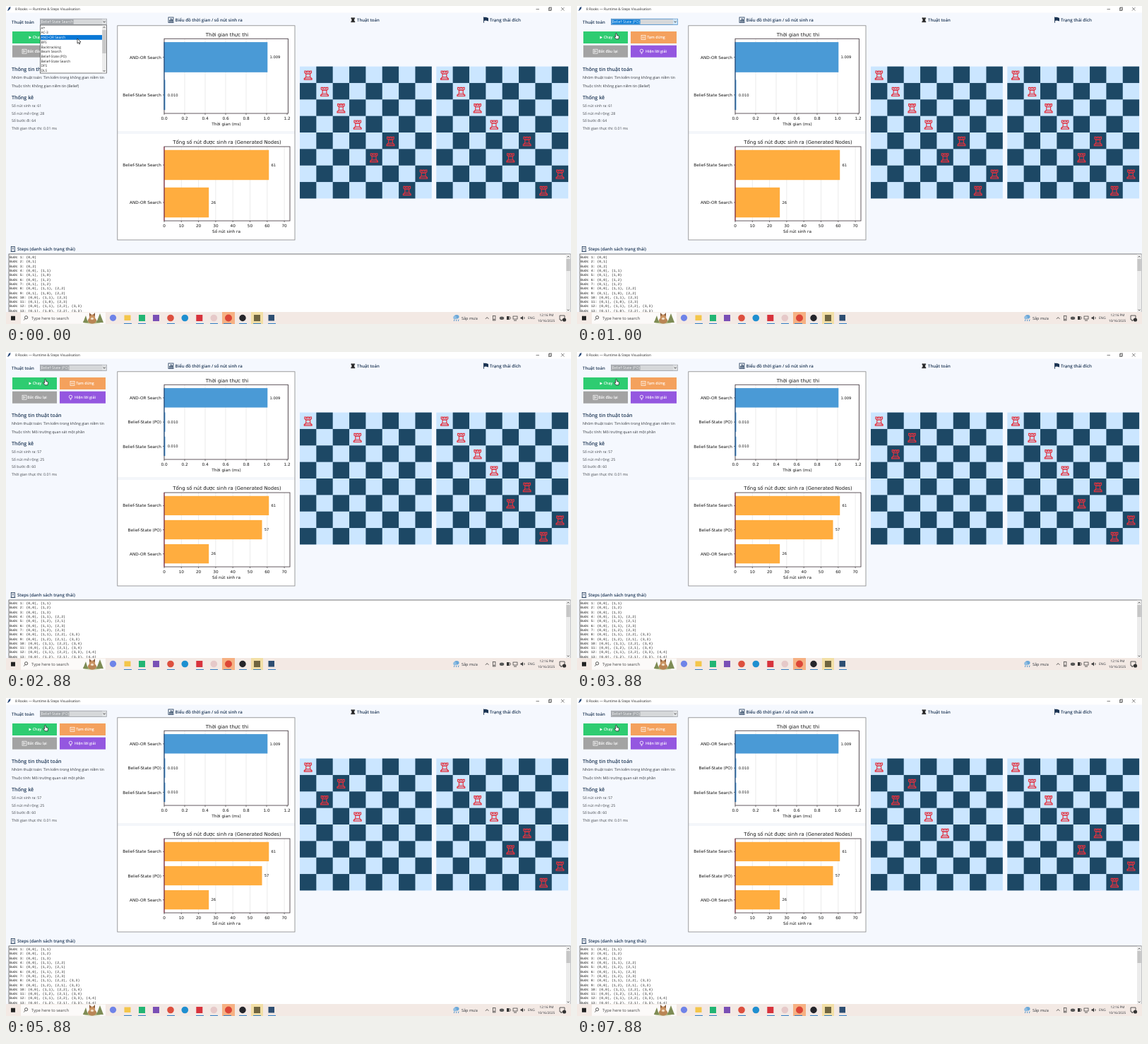
Recreate the animation shown at these times as an HTML page with a canvas. Size 800 by 450 pixels, loop 8000 ms.

```html
<!DOCTYPE html>
<html lang="vi">
<head>
<meta charset="utf-8">
<style>
  html, body { margin: 0; width: 100%; height: 100%; overflow: hidden; background: #f5f8fe; }
  canvas { display: block; width: 800px; height: 450px; }
</style>
</head>
<body>
<canvas id="stage" width="800" height="450"></canvas>
<script>
const ctx = document.getElementById('stage').getContext('2d');
ctx.textRendering = 'geometricPrecision';

const LOOP = 8000, PICK = 600, RUN = 1500, STEP = 500;
const UI = '"Open Sans", "Noto Sans", sans-serif';
const PLOT = '"DejaVu Sans", sans-serif';
const MONO = '"Liberation Mono", monospace';
const NAVY = '#1c3553', INK = '#30343a';

const GOAL = '00 11 22 33 45 54 67 76';
const OLD_STEPS = ['00', '01', '02', '00 11', '01 10', '00 12', '01 12', '00 11 22', '01 10 22',
  '00 11 23', '01 10 23', '00 11 22 33', '01 10 22 33'];
const NEW_STEPS = ['00 11', '00 12', '00 13', '00 11 22', '00 12 21', '00 11 23', '00 12 23', '00 11 22 33',
  '00 12 21 33', '00 11 22 34', '00 12 21 34', '00 11 22 33 44', '00 12 21 33 44'];
const MENU = ['A*', 'AC-3', 'AND-OR Search', 'BFS', 'Backtracking', 'Beam Search',
  'Belief-State (PO)', 'Belief-State Search', 'DFS', 'DLS'];

function rect(x, y, w, h, fill, stroke, width = 0.7) {
  if (fill) { ctx.fillStyle = fill; ctx.fillRect(x, y, w, h); }
  if (stroke) { ctx.strokeStyle = stroke; ctx.lineWidth = width; ctx.strokeRect(x, y, w, h); }
}

function disc(x, y, r, fill, ry = r) {
  ctx.fillStyle = fill;
  ctx.beginPath();
  ctx.ellipse(x, y, r, ry, 0, 0, 7);
  ctx.fill();
}

// points: "x,y x,y ..." ; several strokes are separated by "|"
function path(points, { fill, stroke, width = 0.8, close = false }) {
  ctx.beginPath();
  for (const part of points.split('|')) {
    part.trim().split(' ').forEach((p, i) => {
      const [x, y] = p.split(',').map(Number);
      i ? ctx.lineTo(x, y) : ctx.moveTo(x, y);
    });
    if (close) ctx.closePath();
  }
  if (fill) { ctx.fillStyle = fill; ctx.fill(); }
  if (stroke) { ctx.strokeStyle = stroke; ctx.lineWidth = width; ctx.stroke(); }
}

function at(x, y, draw, scale = 1) {
  ctx.save();
  ctx.translate(x, y);
  ctx.scale(scale, scale);
  draw();
  ctx.restore();
}

// y is the middle of the capital letters
function text(str, x, y, size, { color = INK, weight = 400, font = UI, align = 'left' } = {}) {
  ctx.font = `${weight} ${size}px ${font}`;
  ctx.fillStyle = color;
  ctx.textAlign = align;
  ctx.fillText(str, x, y + size * 0.36);
}

const heading = (str, x, y, size = 6.1) => text(str, x, y, size, { color: NAVY, weight: 600 });

function titleBar() {
  rect(0, 0, 800, 9.5, '#fff');
  path('2,7 4,2 6.5,1 6,4 4,6', { fill: '#2a4a78', close: true });
  text('8 Rooks — Runtime & Steps Visualisation', 13, 4.7, 4.83, { color: '#222' });
  path('750.5,4.5 755,4.5|786,2 790.5,6.5|790.5,2 786,6.5', { stroke: '#333', width: 0.6 });
  rect(768.5, 2.8, 3.4, 3.6, null, '#333', 0.6);
  rect(769.6, 1.9, 3.2, 3.4, null, '#333', 0.4);
}

function button(label, x, y, w, color, icon) {
  rect(x, y, w, 17, color);
  text(label, x + w / 2 + 3.5, y + 8.2, 5.35, { color: '#fff', weight: 600, align: 'center' });
  at(x + w / 2, y + 8.5, icon);
}

function sidebar(ran, t) {
  heading('Thuật toán', 8, 22.5, 6);
  const picked = t >= PICK;
  const focused = picked && !ran;
  const choice = picked ? MENU[6] : MENU[7];
  rect(48.5, 18.2, 94, 8.3, '#d6d8da', focused ? '#2d7cc4' : '#8d9299');
  rect(136, 18.6, 6.2, 7.5, focused ? '#cfe6f8' : '#dfe1e3');
  ctx.font = `5.25px ${UI}`;
  rect(49.3, 19.2, ctx.measureText(choice).width + 0.6, 6.4, focused ? '#0078d7' : '#9da1a5');
  text(choice, 49.5, 22.4, 5.25, { color: '#fff' });
  path('137.7,21.5 139.2,23.2 140.7,21.5', { stroke: '#333' });

  const white = { stroke: '#fff', width: 0.7 };
  button('Chạy', 9, 36, 63, '#2ecc71', () => path('-8,-2 -4.5,0 -8,2', { fill: '#fff', close: true }));
  button('Tạm dừng', 76, 36, 65, '#f4a15d', () => {
    rect(-17.5, -3, 6, 6, null, '#fff');
    path('-15.5,-1.5 -15.5,1.5|-13.5,-1.5 -13.5,1.5', white);
  });
  button('Bắt đầu lại', 9, 55.7, 63, '#a3a3a3', () => {
    rect(-17.5, -3, 6, 6, null, '#fff');
    path('-15.8,1.5 -15.8,-1.5 -13.2,0 -15.8,1.5', white);
  });
  button('Hiện lời giải', 76, 55.7, 65, '#9457e0', () => {
    ctx.beginPath();
    ctx.arc(-17, -0.8, 2.2, 0, 7);
    ctx.strokeStyle = '#fff';
    ctx.stroke();
    path('-18,2.2 -16,2.2|-17.7,3.4 -16.3,3.4', white);
  });

  heading('Thông tin thuật toán', 8, 89.7, 7.1);
  text('Nhóm thuật toán: Tìm kiếm trong không gian niềm tin', 8, 101.5, 5.22);
  text('Thuộc tính: ' + (ran ? 'Môi trường quan sát một phần' : 'Không gian niềm tin (Belief)'), 8, 112.7, 5.22);
  heading('Thống kê', 8, 129, 7.1);
  const [made, expanded, moves] = ran ? [57, 25, 60] : [61, 28, 64];
  [`Số nút sinh ra: ${made}`, `Số nút mở rộng: ${expanded}`, `Số bước đi: ${moves}`, 'Thời gian thực thi: 0.01 ms']
    .forEach((line, i) => text(line, 8, 141.5 + i * 10.4, 5.22, { color: '#44484e' }));
}

function dropdown(cursorY) {
  const pitch = 6.7, top = 27.7;
  const hovered = Math.floor((cursorY - top) / pitch);
  rect(48.5, 27, 94, 68, '#fff', '#444');
  MENU.forEach((item, i) => {
    const y = top + i * pitch;
    if (i === hovered) rect(49, y, 87, pitch, '#0a78d6');
    text(item, 49.5, y + 3.3, 4.8, { color: i === hovered ? '#fff' : '#222' });
  });
  rect(136, 27.5, 6, 67, '#ececec');
  rect(136.3, 34, 5.4, 33, '#c8c8c8');
  path('137.6,31 139,29.4 140.4,31|137.6,91 139,92.6 140.4,91', { stroke: '#444' });
}

function barChart({ top, bottom, right, unit, ticks, title, axis, color, bars }) {
  const left = 224, height = bottom - top;
  const label = { font: PLOT, color: '#161616' };
  const center = { ...label, align: 'center' };
  text(title, 313, top - 6.2, 6.9, center);
  ticks.forEach(v => {
    const x = left + v * unit;
    path(`${x},${top} ${x},${bottom}`, { stroke: '#dedede', width: 0.6 });
    path(`${x},${bottom} ${x},${bottom + 2}`, { stroke: '#222', width: 0.6 });
    text(unit > 100 ? v.toFixed(1) : v, x, bottom + 6.9, 5.75, center);
  });
  // 5% padding around bars that are 0.8 of a slot
  const slot = height / 1.1 / (bars.length - 0.2);
  bars.forEach(([name, value], i) => {
    const y = top + height / 22 + slot * (i + 0.4);
    rect(left, y - slot * 0.4, value * unit, slot * 0.8, color);
    path(`${left - 2},${y} ${left},${y}`, { stroke: '#222', width: 0.6 });
    text(name, left - 4, y, 5.75, { ...label, align: 'right' });
    text(unit > 100 ? value.toFixed(3) : value, left + value * unit + 3.2, y, 5.2, label);
  });
  rect(left, top, right - left, height, null, '#3c3038', 0.8);
  text(axis, 312, bottom + 15.2, 5.75, center);
}

function charts(ran) {
  rect(158, 28, 251, 303, '#f4f6fa');
  rect(158, 28, 251, 149, '#fff');
  rect(158, 181, 251, 150, '#fff');
  rect(157.8, 27.8, 251.2, 303.2, null, '#858585', 0.8);
  const po = ran ? [['Belief-State (PO)', 0.01]] : [];
  barChart({
    top: 46.3, bottom: 152, right: 399.5, unit: 145, ticks: [0, 0.2, 0.4, 0.6, 0.8, 1, 1.2],
    title: 'Thời gian thực thi', axis: 'Thời gian (ms)', color: '#4a9ad6',
    bars: [['AND-OR Search', 1.009], ...po, ['Belief-State Search', 0.01]],
  });
  path('224,51 224,147', { stroke: '#1f5c9c', width: 1 });
  barChart({
    top: 199, bottom: 304, right: 402, unit: 2.43, ticks: [0, 10, 20, 30, 40, 50, 60, 70],
    title: 'Tổng số nút được sinh ra (Generated Nodes)', axis: 'Số nút sinh ra', color: '#ffad3f',
    bars: [['Belief-State Search', 61], ...po.map(([name]) => [name, 57]), ['AND-OR Search', 26]],
  });
  path('224,199 224,304', { stroke: '#a03048', width: 0.9 });
}

function rook(color, filled) {
  const outline = '-4.8,-6 -2.6,-6 -2.6,-4.6 -1.1,-4.6 -1.1,-6 1.1,-6 1.1,-4.6 2.6,-4.6 2.6,-6 4.8,-6 ' +
    '4.8,-3.4 2.9,-2 2.9,2.4 4.4,3.6 4.4,4.6 5.4,4.6 5.4,6.2 -5.4,6.2 -5.4,4.6 -4.4,4.6 -4.4,3.6 -2.9,2.4 -2.9,-2 -4.8,-3.4';
  path(outline, { fill: filled && color, stroke: color, width: 1.15, close: true });
  if (!filled) path('-4,-2.8 4,-2.8|-3,-1.6 3,-1.6|-3,2.4 3,2.4|-4.4,4.2 4.4,4.2', { stroke: color, width: 0.9 });
}

function board(left, rooks) {
  const top = 85.6, cell = 23.35;
  rect(left, top, cell * 8, cell * 8, '#cbe6ff');
  for (let i = 0; i < 64; i++) {
    const row = i >> 3, col = i & 7;
    if ((row + col) % 2) rect(left + col * cell, top + row * cell, cell, cell, '#1d4865');
  }
  for (const [row, col] of rooks.split(' '))
    at(left + (+col + 0.5) * cell, top + (+row + 0.53) * cell, () => rook('#e2323f'));
}

function headers() {
  rect(230, 16, 7, 7.5, null, NAVY, 0.8);
  [[231.2, 3], [233, 5.2], [234.8, 4]].forEach(([x, h]) => rect(x, 22.6 - h, 1.2, h, NAVY));
  heading('Biểu đồ thời gian / số nút sinh ra', 239.5, 19.5);
  at(491.3, 19.7, () => rook('#222', true), 0.5);
  heading('Thuật toán', 497, 19.5, 6);
  path('676.5,15.5 676.5,23.8', { stroke: NAVY, width: 0.9 });
  path('676.5,16 679.5,15.7 683,17 683,21.5 679.5,20.5 676.5,21', { fill: NAVY, close: true });
  heading('Trạng thái đích', 685, 19.5, 6.15);
}

function stepList(steps) {
  rect(7.3, 340.5, 5, 6.8, null, NAVY, 0.8);
  path('8.7,342.5 11,342.5|8.7,344 11,344|6.5,347.3 13.5,347.3', { stroke: NAVY, width: 0.6 });
  heading('Steps (danh sách trạng thái)', 16, 344.2);
  rect(4, 351, 795, 84, '#fff', '#555', 0.8);
  steps.forEach((rooks, i) => {
    const places = rooks.split(' ').map(([r, c]) => `(${r},${c})`).join(', ');
    text(`Bước ${i + 1}: ${places}`, 5, 355.2 + i * 6.32, 4.88, { font: MONO, color: '#1c1c1c' });
  });
  rect(793, 351.5, 6.3, 82, '#ececec');
  rect(793.4, 358, 5.4, 17, '#c6c6c6');
  path('794.7,355.5 796.1,354 797.5,355.5|794.7,429.5 796.1,431 797.5,429.5', { stroke: '#444' });
}

function taskbar() {
  rect(0, 433, 800, 17, '#f3e9e4');
  rect(7, 438.7, 6, 6, '#222');
  rect(21, 433.7, 120, 16, '#fcfaf9');
  ctx.beginPath();
  ctx.arc(28.6, 440.7, 2.1, 0, 7);
  ctx.strokeStyle = '#333';
  ctx.lineWidth = 0.8;
  ctx.stroke();
  path('27.2,442.3 25.2,444.6', { stroke: '#333' });
  text('Type here to search', 36, 441.7, 5.8, { color: '#444' });

  // wild cat among grass
  disc(122, 447, 13, '#a9b77e', 2.6);
  path('109,448 113,438 116,448|128,448 133,435 138,448', { fill: '#7e8c55', close: true });
  disc(122, 445, 6, '#b98555', 4.5);
  disc(122, 440.5, 4.2, '#c99362', 4);
  path('118,439 118,434 121,437|123,437 126,434 126,439', { fill: '#8a5a37', close: true });
  disc(122, 442.3, 2, '#f0dfc8', 1.6);

  rect(306, 433, 18, 17, '#f6b183');
  rect(347, 433, 17, 17, '#f2dfa6');
  disc(151.5, 441.3, 4.6, '#6f83e8');
  rect(167.5, 437.5, 9, 7.5, '#f4c64a');
  rect(188, 437, 9, 9, '#22b573');
  rect(208, 437, 9, 9, '#7a4fb5');
  disc(233, 441.5, 4.8, '#dd4f3e');
  disc(253.3, 441.5, 4.8, '#1f8fd0');
  rect(269.3, 437, 9, 9, '#d8323c');
  disc(294.3, 441.5, 4.8, '#e6c9c9');
  disc(315, 441.5, 5, '#dc4637');
  disc(335, 441.5, 4.7, '#25252b');
  rect(351, 437, 9, 9, '#6f6540');
  rect(371.5, 437, 8.5, 8.5, '#2e4e72');
  [167, 187, 228, 269, 289, 308, 330, 350, 371].forEach(x => rect(x, 448.9, 11, 1.1, '#3b83c5'));

  disc(638, 439.8, 3.5, '#6aa7d8', 2.8);
  disc(635.5, 441, 2.4, '#8fbde2');
  path('635,443.5 634.3,446|638,443.5 637.3,446|641,443.5 640.3,446', { stroke: '#2f7fc4' });
  text('Sắp mưa', 645, 441.7, 5.5);
  const line = { stroke: '#333', width: 0.8 };
  path('679,442.8 681.2,440.5 683.4,442.8', line);
  rect(689.5, 438.3, 3.4, 6.6, null, '#333');
  path('690.2,443.3 692.3,443.3', line);
  disc(702, 441.7, 3.2, '#555', 2.2);
  rect(709, 439, 3.5, 5, '#333');
  path('713.5,439.5 714.5,441.5 713.5,443.5', line);
  rect(718, 439, 6, 4, null, '#333');
  path('719,445 723,445', line);
  path('728.5,440.5 730,440.5 732,438.5 732,444.5 730,442.5 728.5,442.5', { fill: '#333', close: true });
  path('733.4,440 734.2,441.5 733.4,443', line);
  text('ENG', 739, 441.7, 4.7);
  text('12:16 PM', 765.5, 437.7, 4.6, { align: 'center' });
  text('10/16/2025', 765, 445.2, 4.6, { align: 'center' });
  path('784,438 791,438 791,444 787.5,444 786,446 786,444 784,444', { stroke: '#333', width: 0.8, close: true });
  disc(790.5, 444, 2.6, '#333');
}

function between(t, from, to, a, b) {
  const p = Math.min(1, Math.max(0, (t - from) / (to - from)));
  return a + (b - a) * p * p * (3 - 2 * p);
}

function pointer(x, y, hand) {
  const shape = hand
    ? '0,0 1,0 1.4,3 4,3.7 4.6,4.6 4,8.3 0.2,8.3 -2.4,5 -1.8,4.4 -0.4,5.4 -0.4,0.6'
    : '0,0 0,7 1.6,5.6 2.7,8 3.9,7.4 2.8,5.2 5,5';
  at(x, y, () => path(shape, { fill: '#fff', stroke: '#111', width: 0.7, close: true }));
}

function draw(t) {
  const ran = t >= RUN;
  const x = t < PICK ? between(t, 130, 380, 101, 88) : between(t, PICK, 900, 88, 55);
  const y = t < PICK ? between(t, 130, 380, 46, 70) : between(t, PICK, 900, 70, 38.5);
  const step = Math.min(NEW_STEPS.length - 1, Math.floor((t - RUN) / STEP));

  rect(0, 0, 800, 450, '#f5f8fe');
  titleBar();
  headers();
  sidebar(ran, t);
  charts(ran);
  board(416, ran ? NEW_STEPS[step] : GOAL);
  board(609.3, GOAL);
  stepList(ran ? NEW_STEPS : OLD_STEPS);
  taskbar();
  if (t < PICK) dropdown(y);
  pointer(x, y, t >= PICK);
}

const start = performance.now();
function tick() {
  draw((performance.now() - start) % LOOP);
  requestAnimationFrame(tick);
}
tick();
</script>
</body>
</html>
```
